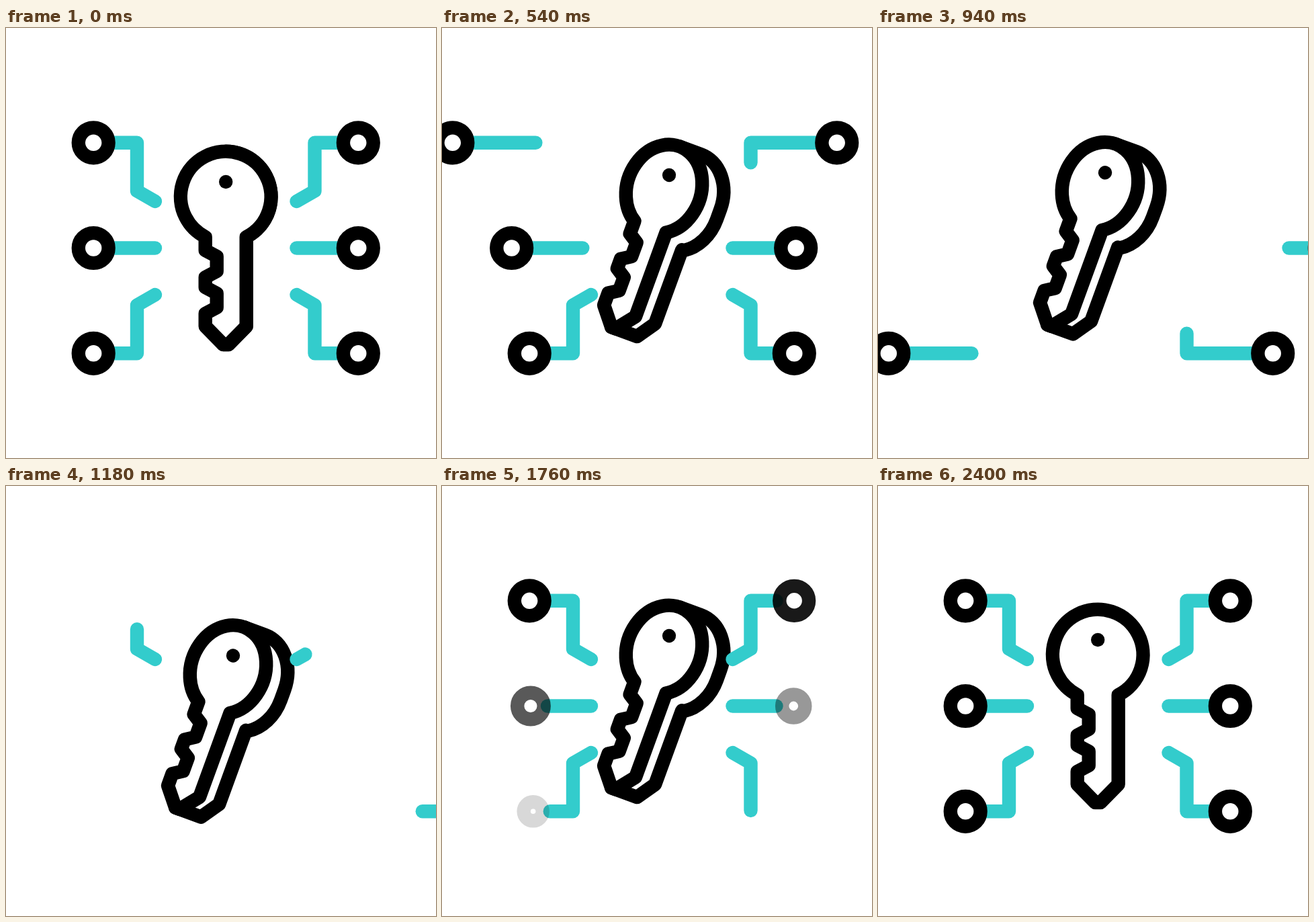
An HTML page with a canvas that plays this animation: 640x640 px, repeating every 2.62 s.

```html
<!DOCTYPE html>
<html lang="en">
<head>
<meta charset="utf-8">
<title>Digital key</title>
<style>
  html, body { margin: 0; width: 100%; height: 100%; overflow: hidden; background: #fff; }
  canvas { display: block; width: 640px; height: 640px; }
</style>
</head>
<body>
<canvas id="stage" width="640" height="640"></canvas>
<script>
const ctx = document.getElementById('stage').getContext('2d');
const LOOP = 2620;
const CYAN = '#33cccc';
const HEAD = 67.3;
const JOINT = Math.atan2(60, 30.5);
const RING = 22.4;
const MIRROR = 654.5;

// Key profile, relative to the centre of its head
const TEETH = [
  [-30.5, 80], [-13.5, 89], [-13.5, 111], [-30.5, 120], [-30.5, 135],
  [-13.5, 144], [-13.5, 165], [-30.5, 174], [-30.5, 193],
  [-4, 220], [4, 220], [30.5, 193]
];

// Height of the key over time: [ms, y]
const BOB = [[0, 251], [400, 247], [800, 221], [1200, 273.5], [1600, 234], [2000, 261], [2400, 251]];

// Wires of the left half, from the inner end to the ring
const WIRES = [
  [[222, 258], [195, 242.5], [195, 170.8]],
  [[222, 327.5]],
  [[222, 397], [195, 412.5], [195, 484.3]]
];

const clamp = u => Math.min(1, Math.max(0, u));
const linear = (t, start, span) => clamp((t - start) / span);
const ease = (t, start, span) => {
  const u = linear(t, start, span);
  return u * u * (3 - 2 * u);
};

function track(keys, t) {
  let value = keys[0][1];
  for (let i = 1; i < keys.length; i++) {
    const [t0, v0] = keys[i - 1], [t1, v1] = keys[i];
    if (t >= t0) value = v0 + (v1 - v0) * ease(t, t0, t1 - t0);
  }
  return value;
}

function paint() {
  ctx.closePath();
  ctx.fill();
  ctx.stroke();
}

function drawKey(t) {
  const turn = ease(t, 0, 400) - ease(t, 2000, 400);
  const sx = 1 - 0.18 * turn;
  const point = (x, y, dx = 0, dy = 0) => ctx.lineTo(x * sx + dx * turn, y + dy * turn);
  const arc = (dx, dy, from, to, back) =>
    ctx.ellipse(dx * turn, dy * turn, HEAD * sx, HEAD, 0, from, to, back);

  ctx.save();
  ctx.translate(327.2 + 3.3 * turn, track(BOB, t));
  ctx.rotate(turn * Math.PI / 9);
  ctx.strokeStyle = '#000';
  ctx.fillStyle = '#fff';

  // Thickness behind the face
  if (turn > 0) {
    ctx.beginPath();
    point(0, -HEAD);
    arc(34, 0, -Math.PI / 2, 0, false);
    arc(34, 16, 0, JOINT, false);
    point(30.5, 60, 31, 16);
    point(30.5, 193, 31);
    point(4, 220, 34);
    point(-4, 220);
    paint();
  }

  ctx.beginPath();
  arc(0, 0, JOINT, Math.PI - JOINT, true);
  TEETH.forEach(([x, y]) => point(x, y));
  paint();

  ctx.fillStyle = '#000';
  ctx.beginPath();
  ctx.arc(0, -22, 10.2, 0, 2 * Math.PI);
  ctx.fill();
  ctx.restore();
}

function pathLength(pts) {
  let sum = 0;
  for (let i = 1; i < pts.length; i++) {
    sum += Math.hypot(pts[i][0] - pts[i - 1][0], pts[i][1] - pts[i - 1][1]);
  }
  return sum;
}

function drawWire(pts, from, to) {
  if (to - from < 0.1) return;
  ctx.strokeStyle = CYAN;
  ctx.setLineDash([to - from, 2000]);
  ctx.lineDashOffset = -from;
  ctx.beginPath();
  pts.forEach(([x, y]) => ctx.lineTo(x, y));
  ctx.stroke();
  ctx.setLineDash([]);
}

function drawRing(x, y, r, alpha) {
  if (alpha <= 0) return;
  ctx.globalAlpha = alpha;
  ctx.strokeStyle = '#000';
  ctx.beginPath();
  ctx.arc(x, y, r, 0, 2 * Math.PI);
  ctx.stroke();
  ctx.globalAlpha = 1;
}

function drawNode(i, t) {
  const right = i % 2 === 1;
  const wire = WIRES[i >> 1];
  const y = wire[wire.length - 1][1];
  const travel = right ? 179 : 190;
  const delay = i * 100;
  const pts = [...wire, [157 - travel, y]];
  const total = pathLength(pts);
  const rest = total - travel;
  const enter = 1000 + delay;

  ctx.save();
  if (right) {
    ctx.translate(MIRROR, 0);
    ctx.scale(-1, 1);
  }
  if (t < enter) {
    const shift = travel * ease(t, 200 + delay, 600);
    drawWire(pts, total * ease(t, 264 + delay, 570), rest + shift);
    drawRing(130.2 - shift, y, RING, 1);
  } else {
    const alpha = linear(t, enter + 300, 400);
    const shrink = 10.4 * Math.pow(1 - alpha, 1.3);
    drawWire(pts, 0, rest * ease(t, enter, 400));
    drawRing(130.2 + shrink * (right ? 0.2 : 0.65), y, RING - shrink, alpha);
  }
  ctx.restore();
}

function draw(t) {
  ctx.fillStyle = '#fff';
  ctx.fillRect(0, 0, 640, 640);
  ctx.lineWidth = 20.4;
  ctx.lineCap = ctx.lineJoin = 'round';
  drawKey(t);
  for (let i = 0; i < 6; i++) drawNode(i, t);
}

const start = performance.now();
function tick() {
  draw((performance.now() - start) % LOOP);
  requestAnimationFrame(tick);
}
tick();
</script>
</body>
</html>
```
